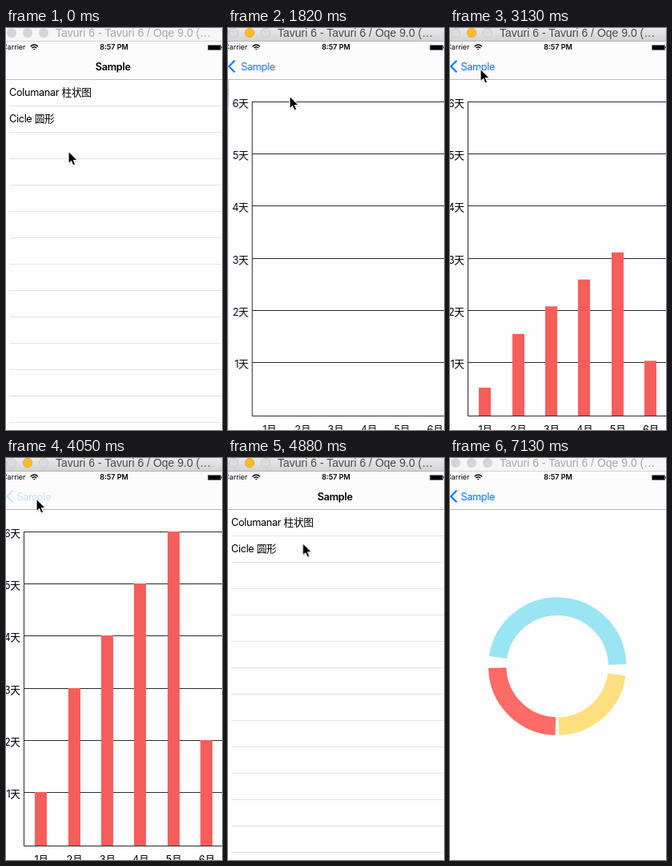
An HTML page that plays this animation: 270x503 px, repeating every 7190 ms.

```html
<!DOCTYPE html>
<html lang="en">
<head>
<meta charset="utf-8">
<title>Sample charts</title>
<style>
  html, body { margin: 0; width: 100%; height: 100%; overflow: hidden; background: #fff; }
  svg { display: block; width: 270px; height: 503px; overflow: hidden; }
  text { font: 12.75px Inter, "Noto Sans CJK SC", "Noto Sans CJK", sans-serif; letter-spacing: -.35px; }
  .window { font: 14px "Liberation Sans", Arial, sans-serif; letter-spacing: 0; }
  .status { font-size: 9px; letter-spacing: 0; }
  .strong { font-weight: 600; }
  .middle { text-anchor: middle; }
  .end { text-anchor: end; }
  .arc { fill: none; stroke-width: 22.6; stroke-dasharray: 1 2; }

  /* One loop is 7190 ms; 1% is 71.9 ms. */
  .list, .shade, .chart, .rings, .heading, .back, .arrow, .row1 {
    animation: 7190ms cubic-bezier(.2, .75, .2, 1) infinite;
  }
  .list { animation-name: list; }
  .shade { animation-name: shade; }
  .chart { animation-name: chart; }
  .rings { animation-name: rings; }
  .heading { animation-name: heading; }
  .back { animation-name: back; }
  .arrow { animation-name: arrow; }
  .row1 { animation-name: row1; }
  .row2 { animation: row2 7190ms step-end infinite; }
  .active { animation: active 7190ms step-end infinite; }
  .bars { transform-origin: 0 485px; animation: bars 7190ms ease-in-out infinite; }
  .arc { animation: draw 7190ms ease-in-out infinite; }
  .cursor { animation: cursor 7190ms linear infinite; }

  @keyframes list {
    0%, 19.89%, 66.76%, 71.63% { transform: translateX(0); }
    28.51%, 58.41%, 77.33%, 100% { transform: translateX(-84px); }
  }
  @keyframes shade {
    0%, 19.89%, 66.76%, 71.63% { opacity: 0; }
    28.51%, 58.41%, 77.33%, 100% { opacity: .1; }
  }
  @keyframes chart {
    0%, 19.89%, 66.76%, 100% { transform: translateX(281px); }
    28.51%, 58.41% { transform: translateX(0); }
  }
  @keyframes rings {
    0%, 71.63% { transform: translateX(281px); }
    77.33%, 100% { transform: translateX(0); }
  }
  @keyframes heading {
    0%, 19.89%, 66.76%, 71.63% { transform: translateX(0); opacity: 1; }
    28.51%, 58.41%, 77.33%, 100% { transform: translateX(-98px); opacity: 0; }
  }
  @keyframes back {
    0%, 19.89%, 66.76%, 71.63% { transform: translateX(98px); opacity: 0; }
    28.51%, 56.32%, 77.33%, 100% { transform: translateX(0); opacity: 1; }
    56.33%, 58.41% { transform: translateX(0); opacity: .2; }
  }
  @keyframes arrow {
    0%, 19.89%, 66.76%, 71.63% { opacity: 0; }
    28.51%, 56.32%, 77.33%, 100% { opacity: 1; }
    56.33%, 58.41% { opacity: .2; }
  }
  @keyframes row1 {
    0%, 18.21% { opacity: 0; }
    18.22%, 58.41% { opacity: 1; }
    66.5%, 100% { opacity: 0; }
  }
  @keyframes row2 {
    0% { opacity: 0; }
    71.49%, 100% { opacity: 1; }
  }
  @keyframes active {
    0% { opacity: 0; }
    18.22% { opacity: 1; }
    99.16%, 100% { opacity: 0; }
  }
  @keyframes bars {
    0%, 36.72% { transform: scaleY(0); }
    50.07%, 66.9% { transform: scaleY(1); }
    67%, 100% { transform: scaleY(0); }
  }
  @keyframes draw {
    0%, 71.25% { stroke-dashoffset: 1; }
    84.05%, 100% { stroke-dashoffset: 0; }
  }
  @keyframes cursor {
    0%, .42% { transform: translate(78px, 154px); }
    3.5% { transform: translate(90px, 149px); }
    7.37%, 9.46% { transform: translate(95px, 151px); }
    11.5% { transform: translate(111px, 126px); }
    14.88%, 28.5% { transform: translate(77px, 85px); }
    29.49%, 32.41% { transform: translate(82px, 86px); }
    41.8% { transform: translate(40px, 53px); }
    43.1%, 60% { transform: translate(38px, 51px); }
    66% { transform: translate(86px, 96px); }
    67.87% { transform: translate(93px, 106px); }
    68.29% { transform: translate(101px, 111px); }
    69.4%, 86.23% { transform: translate(113px, 115px); }
    86.9% { transform: translate(104px, 160px); }
    87.7% { transform: translate(118px, 300px); }
    88.45% { transform: translate(145px, 476px); opacity: 1; }
    88.46%, 100% { transform: translate(145px, 476px); opacity: 0; }
  }
</style>
</head>
<body>
<svg viewBox="0 0 270 503">
  <defs>
    <linearGradient id="metal" x2="0" y2="1">
      <stop stop-color="#e9e9e9"/><stop offset="1" stop-color="#d2d2d2"/>
    </linearGradient>
  </defs>
  <rect width="270" height="503" fill="#fff"/>

  <g class="list">
    <rect x="-7" width="288" height="503" fill="#fefefe"/>
    <rect class="row1" x="-7" y="65" width="288" height="33" fill="#d9d9d9"/>
    <rect class="row2" x="-7" y="98" width="288" height="33" fill="#d9d9d9"/>
    <path id="rules" stroke="#e4e4e4"/>
    <text x="4" y="85">Columanar 柱状图</text>
    <text x="4" y="118">Cicle 圆形</text>
    <rect class="shade" x="-7" width="288" height="503"/>
  </g>

  <g class="chart">
    <rect x="-7" width="288" height="503" fill="#fefefe"/>
    <path id="grid" fill="none" stroke="#2b2b2b"/>
    <g id="labels"></g>
    <g class="bars" id="bars" fill="#f65e5c"></g>
  </g>

  <g class="rings">
    <rect x="-7" width="288" height="503" fill="#fefefe"/>
    <g id="arcs"></g>
  </g>

  <rect y="17" width="270" height="47" fill="#fcfcfc"/>
  <path d="M0 64.5h270" stroke="#b9b9b9"/>
  <text class="status" x="-5" y="27">Carrier</text>
  <g fill="none" stroke="#000" stroke-width="1.4">
    <path d="M30.6 23.2q4.7-4.2 9.4 0M32.4 25q2.9-2.6 5.8 0"/>
    <path d="M33.9 26l1.4 1.5 1.4-1.5z" fill="#000" stroke="none"/>
  </g>
  <text class="status strong middle" x="135" y="27">8:57 PM</text>
  <rect x="252" y="21" width="17" height="7" rx="1" fill="#777"/>
  <rect x="253" y="22" width="15" height="5"/>
  <rect x="269.3" y="23" width="1" height="2.5"/>
  <text class="heading strong middle" x="133.7" y="53">Sample</text>
  <path class="arrow" d="M8.4 40.8L1.2 48l7.2 7.2" fill="none" stroke="#007aff" stroke-width="2.2"/>
  <text class="back" x="13.4" y="53" fill="#007aff">Sample</text>

  <g>
    <rect width="270" height="17" fill="#f6f6f6"/>
    <path d="M0 16.5h270" stroke="#d6d6d6"/>
    <g fill="#d5d5d5">
      <circle cx="7" cy="6" r="6"/><circle cx="27" cy="6" r="6"/><circle cx="47" cy="6" r="6"/>
    </g>
    <text class="window" x="62" y="11" fill="#a8a8a8">Tavuri 6 - Tavuri 6 / Oqe 9.0 (…</text>
  </g>
  <g class="active">
    <rect width="270" height="17" fill="url(#metal)"/>
    <path d="M0 16.5h270" stroke="#b4b4b4"/>
    <g fill="#dcdcdc" stroke="#c6c6c6" stroke-width=".8">
      <circle cx="7" cy="6" r="5.7"/>
      <circle cx="27" cy="6" r="5.7" fill="#fdbb2a" stroke="#e3a425"/>
      <circle cx="47" cy="6" r="5.7"/>
    </g>
    <text class="window" x="62" y="11" fill="#4a4a4a">Tavuri 6 - Tavuri 6 / Oqe 9.0 (…</text>
  </g>

  <g class="cursor">
    <path d="M.2 2v15.4l3.5-3 2.2 5 3.2-1.3-2.1-4.9h5z" opacity=".22"/>
    <path d="M0 .2v16l3.6-3.4 2.2 5.2 3-1.2-2.2-5.1h4.9z" stroke="#fff" stroke-width="1.2"/>
  </g>
</svg>
<script>
  const el = id => document.getElementById(id);
  const range = n => [...Array(n).keys()];

  el("rules").setAttribute("d", range(13).map(i => `M4 ${97.5 + 33 * i}h277`).join(""));

  const lineY = day => Math.floor(484 - 65.3 * day) + .5;
  el("grid").setAttribute("d", "M270 485.5H22.5V92" + range(6).map(i => `M22 ${lineY(i + 1)}h259`).join(""));

  const monthX = i => 44 + 41.4 * i;
  el("labels").innerHTML = range(6).map(i =>
    `<text class="end" x="17.7" y="${lineY(i + 1) + 6.5}">${i + 1}天</text>` +
    `<text class="middle" x="${monthX(i)}" y="507">${i + 1}月</text>`).join("");

  el("bars").innerHTML = [1, 3, 4, 5, 6, 2].map((days, i) =>
    `<rect x="${Math.round(monthX(i) - 7.8)}" y="${lineY(days) - .5}" width="15" height="${485.5 - lineY(days)}"/>`).join("");

  const point = deg => {
    const a = deg * Math.PI / 180;
    return `${134.2 + 75 * Math.cos(a)} ${260.6 + 75 * Math.sin(a)}`;
  };
  const arc = (from, to, color) =>
    `<path class="arc" pathLength="1" stroke="${color}" d="M${point(from)}A75 75 0 0 1 ${point(to)}"/>`;
  el("arcs").innerHTML =
    arc(188.6, 358.3, "#9ae5f3") + arc(8, 88.7, "#ffe080") + arc(91.8, 178.6, "#ff6b66");
</script>
</body>
</html>
```
